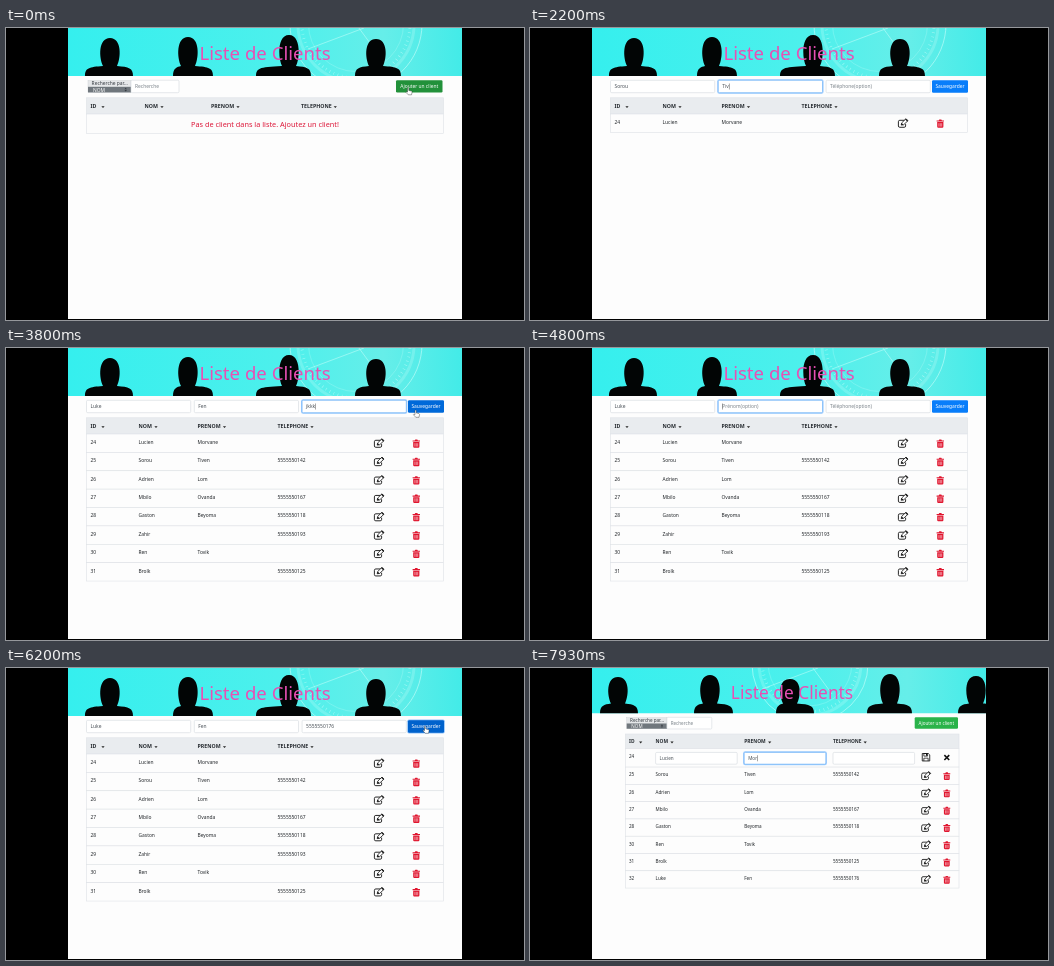
Write an HTML page that moves like this. It is 518x292 px and loops after 8 s.

```html
<!DOCTYPE html>
<html lang="fr">
<head>
<meta charset="utf-8">
<title>Liste de Clients</title>
<style>
  html, body { margin: 0; width: 100%; height: 100%; overflow: hidden; background: #000; }
  svg { display: block; width: 518px; height: 292px; font-family: "Noto Sans", "Open Sans", sans-serif; }
  text { white-space: pre; }
</style>
</head>
<body>
<svg id="stage" viewBox="0 0 518 292"></svg>
<script>
const LOOP = 8000;
const stage = document.getElementById('stage');
const pen = document.createElement('canvas').getContext('2d');

const clients = [
  [24, 'Lucien', 'Morvane', ''],
  [25, 'Sorou', 'Tiven', '5555550142'],
  [26, 'Adrien', 'Lom', ''],
  [27, 'Mbilo', 'Ovanda', '5555550167'],
  [28, 'Gaston', 'Beyoma', '5555550118'],
  [29, 'Zahir', '', '5555550193'],
  [30, 'Ren', 'Tovik', ''],
  [31, 'Brolk', '', '5555550125'],
  [32, 'Luke', 'Fen', '5555550176']
];

const wide = {
  scale: 1, banner: 48, title: [259, 32.2, 18.6],
  people: [[104, 10, 79, 127], [182, 9, 167, 207], [283, 7, 250, 305], [370, 11, 349, 395]],
  clock: [350, -4, 66], bar: [82, 52.2], button: [390, 52.2, 46.5],
  table: [80.5, 437.5], head: [69.8, 86], row: 18.38,
  cols: [84.5, 132.5, 191.5, 271.5], arrows: [97, 150, 218.5, 306], icons: [373, 410.3]
};
const empty = { ...wide, cols: [84.5, 138.5, 205, 295], arrows: [97, 156, 232, 329.3] };
const narrow = {
  scale: .935, banner: 45.5, title: [262, 30.6, 17.35],
  people: [[88, 9, 70, 108], [180, 7, 164, 203], [260, 11, 246, 284], [360, 6, 337, 382], [446, 8, 428, 470]],
  clock: [280, -4, 58], bar: [96.7, 49.3], button: [384.7, 49.3, 43.3],
  table: [95.5, 429], head: [66, 80.5], row: 17.28,
  cols: [99, 125.6, 214.2, 303], arrows: [110.7, 142, 239.7, 335.2], icons: [396, 416.8]
};

// form entries: [text, focus time, time the typing ends]
const scenes = [
  { at: 0, look: empty, rows: 0, hover: 0, hand: [401.5, 59.5] },
  { at: 130, look: empty, rows: 0, hover: 790,
    form: [['Lucien', 190, 450], ['Morvane', 460, 760]], hand: [419, 60] },
  { at: 930, look: wide, rows: 1, hover: 1270, hand: [403, 60] },
  { at: 1400, look: wide, rows: 1, hover: 2460,
    form: [['Sorou', 1530, 1860], ['Tiven', 1990, 2320], ['5555550142', 2330, 2450]], hand: [414, 61] },
  { at: 2530, look: wide, rows: 2, hover: 2660, hand: [403, 60] },
  { at: 2800, look: wide, rows: 2, hover: 3390,
    form: [['Adrien', 2860, 3130], ['Lom', 3140, 3330]], hand: [413, 61] },
  { at: 3530, look: wide, rows: 8, hover: 3730,
    form: [['Luke', 0, 1], ['Fen', 1, 2], ['jkkk', 3480, 3710]], hand: [409, 62] },
  { at: 4000, look: wide, rows: 8, hover: 4060, hand: [403, 60] },
  { at: 4200, look: wide, rows: 8, hover: 5930, press: 6060,
    form: [['Luke', 4330, 4660], ['Fen', 4730, 5030], ['5555550176', 5190, 5850]], hand: [418.5, 58] },
  { at: 6260, look: wide, rows: 9 },
  { at: 6600, look: narrow, rows: 9 },
  { at: 6800, look: narrow, rows: 9, removed: 29 },
  { at: 7130, look: narrow, rows: 9, removed: 29, edit: true }
];

const rect = (x, y, w, h, fill, extra = '') =>
  `<rect x="${x}" y="${y}" width="${w}" height="${h}" fill="${fill}" ${extra}/>`;
const text = (x, y, s, size = 4.9, fill = '#212529', extra = '') =>
  `<text x="${x}" y="${y}" font-size="${size}" fill="${fill}" ${extra}>${s}</text>`;
const path = (d, extra) => `<path d="${d}" ${extra}/>`;
const at = (x, y, k, body) => `<g transform="translate(${x} ${y}) scale(${k})">${body}</g>`;
const clamp = v => Math.max(0, Math.min(1, v));

function person([c, top, left, right], base) {
  const neck = base - 10;
  return path(`M${left} ${base}C${left} ${base - 8} ${left + 4} ${base - 9} ${c - 7} ${neck}
    C${c - 11} ${neck - 8} ${c - 12} ${top} ${c} ${top}C${c + 12} ${top} ${c + 11} ${neck - 8} ${c + 7} ${neck}
    C${right - 4} ${base - 9} ${right} ${base - 8} ${right} ${base}Z`, 'fill="#020505"');
}

function banner(look) {
  const [cx, cy, r] = look.clock;
  const ring = (radius, width, opacity) =>
    `<circle cx="${cx}" cy="${cy}" r="${radius}" fill="none" stroke="#d5fffb" stroke-width="${width}" opacity="${opacity}"/>`;
  const clock = ring(r, 1, .55) + ring(r * .88, 3, .22) + ring(r * .72, .6, .4) +
    `<circle cx="${cx}" cy="${cy}" r="${r * .82}" fill="none" stroke="#e4fffc" stroke-width="3" stroke-dasharray=".5 3.8" opacity=".6"/>` +
    path(`M${cx - 48} ${cy + 25}L${cx + 8} ${cy + 4}M${cx} ${cy}l22 30`, 'stroke="#d5fffb" stroke-width=".8" opacity=".6"');
  const [x, y, size] = look.title;
  return `<defs><linearGradient id="sea"><stop stop-color="#35efee"/><stop offset=".55" stop-color="#4df0ec"/>
    <stop offset=".8" stop-color="#66eee9"/><stop offset="1" stop-color="#43ebe8"/></linearGradient>
    <clipPath id="top">${rect(62, 0, 394, look.banner, '#000')}</clipPath></defs>
    <g clip-path="url(#top)">${rect(62, 0, 394, look.banner, 'url(#sea)')}${clock}
    ${look.people.map(p => person(p, look.banner)).join('')}</g>` +
    text(x, y, 'Liste de Clients', size, '#e84fb4', 'text-anchor="middle" font-weight="500"');
}

function input(x, y, w, h, value, hint, focused, size) {
  const ring = focused ? rect(x - .5, y - .5, w + 1, h + 1, 'none', 'rx="1.4" stroke="#9fcdff" stroke-width="1.2"') : '';
  pen.font = `${size}px "Noto Sans", "Open Sans", sans-serif`;
  const caret = x + 4.2 + (value ? pen.measureText(value).width : 0);
  return ring + rect(x, y, w, h, '#fff', `rx="1.2" stroke="${focused ? '#55a5f5' : '#d3d8dd'}" stroke-width=".6"`) +
    text(x + 4, y + h / 2 + size * .36, value || hint, size, value ? '#495057' : '#7b838a') +
    (focused ? rect(caret, y + h / 2 - 3, .4, 6, '#222') : '');
}

function button(x, y, w, h, label, size, fill, ring) {
  return (ring ? rect(x - .8, y - .8, w + 1.6, h + 1.6, '#8fc3fb', 'rx="1.8"') : '') +
    rect(x, y, w, h, fill, 'rx="1.2"') +
    text(x + w / 2, y + h / 2 + size * .36, label, size, '#fff', 'text-anchor="middle"');
}

function searchBar(look, hovered) {
  const k = look.scale, [x, y] = look.bar, [bx, by, bw] = look.button;
  const body = rect(0, .3, 43, 12, '#e6e8ea', 'stroke="#c9cdd1" stroke-width=".4"') +
    text(3.6, 5.2, 'Recherche par...', 4.9, '#343a40') + rect(0, 6.6, 43, 5.6, '#70777d') +
    text(5, 11.4, 'NOM', 4.9, '#fff') +
    path('M36.5 9l1.2-1.5 1.2 1.5zM36.5 9.8l1.2 1.5 1.2-1.5z', 'fill="#343a40"') +
    input(43, 0, 48, 12.5, '', 'Recherche', false, 4.9);
  return at(x, y, k, body) +
    button(bx, by, bw, 12.3 * k, 'Ajouter un client', 4.9 * k, hovered ? '#22913a' : '#2ab34a');
}

function entryForm(scene, t) {
  const hints = ['Nom', 'Prénom(option)', 'Téléphone(option)'];
  const pressed = t >= scene.press;
  const active = scene.form.findLastIndex(f => t >= f[1]);
  const fields = hints.map((hint, i) => {
    const [word, start, end] = scene.form[i] || ['', 0, 1];
    const value = word.slice(0, Math.floor(word.length * clamp((t - start) / (end - start)) + 1e-6));
    return input(80.5 + 107.8 * i, 52.3, 104.2, 12.4, value, hint, i === active && !pressed, 4.9);
  }).join('');
  const fill = pressed ? '#0062cc' : t >= scene.hover ? '#0069d9' : '#087dfa';
  return fields + button(402, 52.3, 36, 12.4, 'Sauvegarder', 4.9, fill, pressed);
}

const editIcon = path('M2.2-3H-3.2Q-4.6-3-4.6-1.6V2.7Q-4.6 4-3.2 4H1.2Q2.6 4 2.6 2.7V.8', 'fill="none" stroke="#111" stroke-width=".9"') +
  path('M-1.8 1.8L-1.3-.4 3-4.6 5-2.6.6 1.5Z', 'fill="#fff" stroke="#111" stroke-width=".8"') +
  path('M-1.8 1.8L-1.3-.4.6 1.5ZM2.2-3.8L3-4.6 5-2.6 4.2-1.8Z', 'fill="#111"');
const trashIcon = path('M-3.7-3.2H-1.6L-1-4.2H1L1.6-3.2H3.7V-2.1H-3.7ZM-3.1-1.6H3.1V3Q3.1 4.2 2 4.2H-2Q-3.1 4.2-3.1 3Z', 'fill="#e0162f"') +
  path('M-1.4-.4V3M0-.4V3M1.4-.4V3', 'stroke="#fff" stroke-width=".5"');
const saveIcon = path('M-4-4H2.5L4-2.5V4H-4Z', 'fill="#fff" stroke="#111" stroke-width=".9"') +
  path('M-2.3-4H1.7V-1.2H-2.3ZM-2.3 4V1H2.3V4', 'fill="none" stroke="#111" stroke-width=".8"') + rect(0, -3.8, 1.3, 2.2, '#111');
const closeIcon = path('M-2.6-2.6L2.6 2.6M2.6-2.6L-2.6 2.6', 'stroke="#111" stroke-width="1.7"');

function editRow(look, client, top, t) {
  const left = 7 - Math.floor(4 * clamp((t - 7330) / 500));
  const values = [client[1], client[2].slice(0, left), ''];
  return values.map((v, i) => input(look.cols[i + 1], top + 3.9, 81.6, 11.8, v, '', i === 1, 4.6)).join('');
}

function table(scene, t) {
  const { look } = scene, k = look.scale, [x0, x1] = look.table, [h0, h1] = look.head, w = x1 - x0;
  const line = 'stroke="#dee2e6" stroke-width=".6"';
  let out = rect(x0, h0, w, h1 - h0, '#e9ecef', line);
  ['ID', 'NOM', 'PRENOM', 'TELEPHONE'].forEach((label, i) => {
    const mid = (h0 + h1) / 2;
    out += text(look.cols[i], mid + 1.9, label, 5.25 * k, '#272c31', 'font-weight="700"') +
      path(`M${look.arrows[i] - 1.6} ${mid + .3}h3.2l-1.6 1.9z`, 'fill="#222"');
  });
  if (!scene.rows) {
    return out + rect(x0, h1, w, 19.3, '#fcfcfc', line) +
      text(259, 99.2, 'Pas de client dans la liste. Ajoutez un client!', 7.3, '#dc1739', 'text-anchor="middle"');
  }
  let y = h1;
  clients.slice(0, scene.rows).filter(c => c[0] !== scene.removed).forEach((client, i) => {
    const editing = scene.edit && i === 0;
    const height = editing ? 18.6 : look.row;
    const mid = y + look.row / 2;
    out += rect(x0, y, w, height, '#fdfdfd', line);
    out += client.map((v, c) => editing && c ? '' : text(look.cols[c], mid + .7 * k, v, 4.9 * k)).join('');
    if (editing) out += editRow(look, client, y, t);
    out += at(look.icons[0], mid + .1, k, editing ? saveIcon : editIcon) +
      at(look.icons[1], mid + .4, k, editing ? closeIcon : trashIcon);
    y += height;
  });
  return out;
}

const hand = ([x, y]) => at(x, y, 1,
  path('M0 .6Q.7-.4 1.3.6V3L4 3.6Q4.8 4 4.5 5L4 7.3H.8L-1.6 4.7Q-1.5 3.7 0 4.6Z', 'fill="#fff" stroke="#222" stroke-width=".4"'));

function render(t) {
  const scene = scenes.findLast(s => t >= s.at);
  const hovered = t >= scene.hover;
  return rect(0, 0, 518, 292, '#000') + rect(62, 0, 394, 291, '#fdfdfd') + banner(scene.look) +
    (scene.form ? entryForm(scene, t) : searchBar(scene.look, hovered)) +
    table(scene, t) + (hovered && scene.hand ? hand(scene.hand) : '');
}

const started = performance.now();
let shown = '';
function tick() {
  const picture = render((performance.now() - started) % LOOP);
  if (picture !== shown) stage.innerHTML = shown = picture;
  requestAnimationFrame(tick);
}
tick();
</script>
</body>
</html>
```
